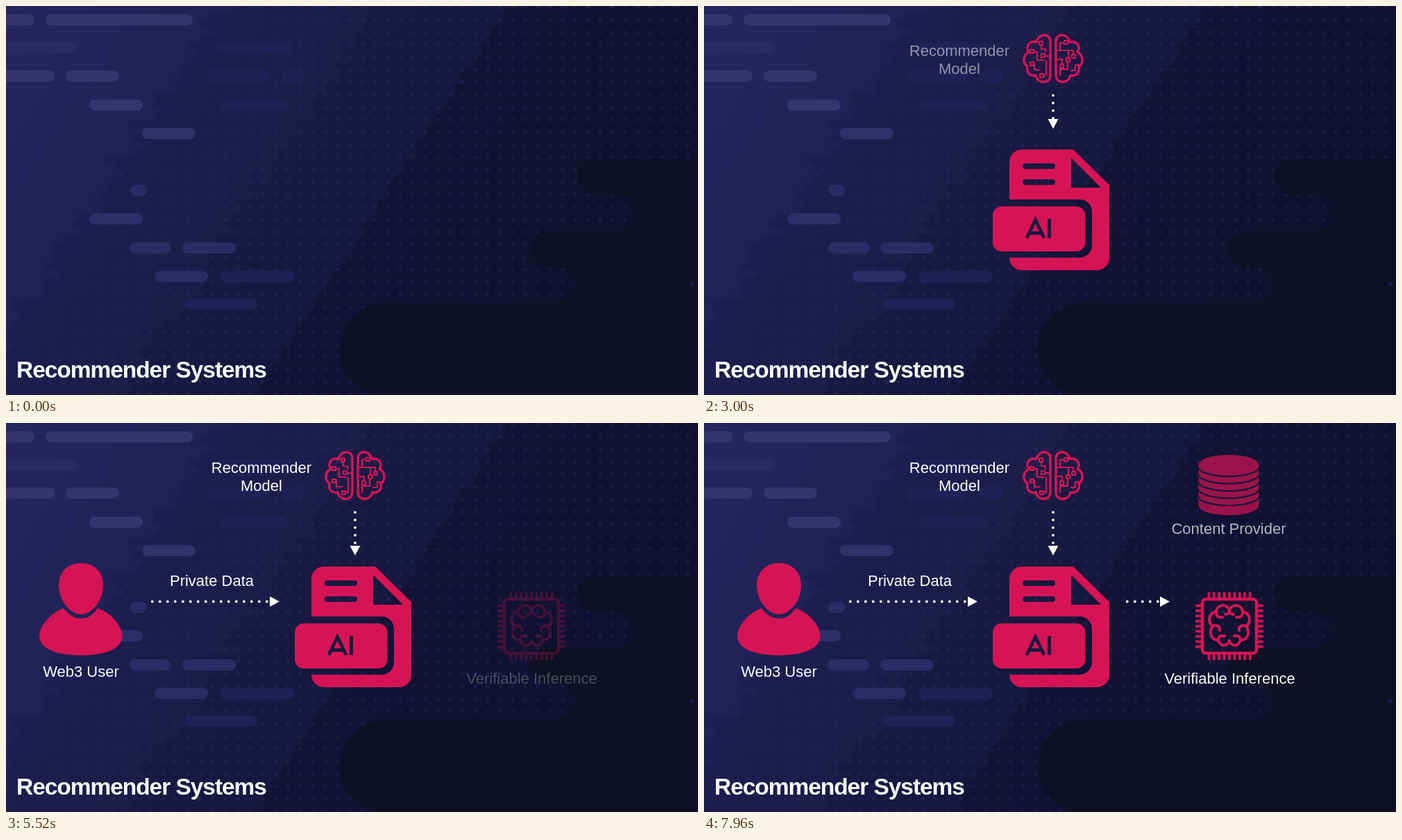
Recreate the animation shown at these times as an HTML page. Size 997 by 561 pixels, loop 8 s.

```html
<!DOCTYPE html>
<html lang="en">
<head>
<meta charset="utf-8">
<title>Recommender Systems</title>
<style>
html, body { margin: 0; width: 100%; height: 100%; overflow: hidden; background: #131433; }
svg { display: block; width: 100%; height: 100%; }
text { font: 22px "Liberation Sans", Arial, sans-serif; fill: #fff; text-anchor: middle; }
.title { font-size: 33.5px; font-weight: bold; letter-spacing: -1.05px; text-anchor: start; }
.red { fill: #d61455; }
.line { fill: none; stroke: #d61455; stroke-linejoin: round; stroke-linecap: round; }
.cut { fill: none; stroke: #17183d; }
.dots { stroke: #fff; stroke-width: 3.8; stroke-linecap: round; stroke-dasharray: 0 11; }
</style>
</head>
<body>
<svg viewBox="0 0 997 561">
  <defs>
    <linearGradient id="base" gradientUnits="userSpaceOnUse" x1="0" y1="0" x2="837" y2="547">
      <stop offset="0" stop-color="#252661"/>
      <stop offset=".6" stop-color="#1a1b45"/>
      <stop offset="1" stop-color="#141434"/>
    </linearGradient>
    <linearGradient id="fade" gradientUnits="userSpaceOnUse" x1="0" y1="0" x2="837" y2="547">
      <stop offset=".15" stop-color="#fff" stop-opacity="0"/>
      <stop offset=".45" stop-color="#fff"/>
    </linearGradient>
    <mask id="dotFade"><rect width="997" height="561" fill="url(#fade)"/></mask>
    <pattern id="grid" width="18" height="18" patternUnits="userSpaceOnUse" x="1" y="11">
      <circle cx="9" cy="9" r="2.7" fill="#30326f" opacity=".3"/>
    </pattern>
  </defs>

  <rect width="997" height="561" fill="url(#base)"/>
  <g id="bands" fill="#0c0d26"></g>
  <rect width="997" height="561" fill="url(#grid)" mask="url(#dotFade)"/>
  <g id="bars"></g>
  <path fill="#0f1023" d="M997 221H848a25.5 25.5 0 0 0 0 51H883a26 26 0 0 1 0 52H781a26 26 0 0 0 0 52H794a26 26 0 0 1 0 52H548a67 67 0 0 0 0 134H997z"/>
  <circle cx="989" cy="401" r="3" fill="#1b1c50"/>
  <text class="title" x="15" y="536">Recommender Systems</text>

  <g id="file">
    <path class="red" fill-rule="evenodd" d="M440 279V225a18 18 0 0 1 18-18H532L584 258V363a18 18 0 0 1-18 18H458a18 18 0 0 1-18-18H541a18 18 0 0 0 18-18V297a18 18 0 0 0-18-18z
      M529 219V262H572z M463 227h39a4 4 0 0 1 0 8h-39a4 4 0 0 1 0-8z M463 250h39a4 4 0 0 1 0 8h-39a4 4 0 0 1 0-8z"/>
    <rect class="red" x="416" y="289" width="133.500" height="65" rx="13"/>
    <path class="cut" stroke-width="4.800" d="M465 334.500L477.500 308.500L490 334.500M469 327.500H486M497.500 307V334.500"/>
  </g>

  <g id="brain" class="line" stroke-width="3.400">
    <path id="half" d="M499 50C498 39 482 39 479 52C468 49 463 60 468 66C459 71 459 83 466 87C464 97 471 102 478 100C481 113 498 112 499 101Z"/>
    <use href="#half" transform="matrix(-1 0 0 1 1006 0)"/>
    <path stroke-width="2.200" d="M486 56V62H492V66M475 66H480V78H490M491 72H498M476 83V92H484M489 100H493V79M508 64H532V69M519 53H513V64M525 64V74M516 83V77H508M513 100V91H524V80M529 93H535V85H541"/>
    <path stroke-width="2.200" d="M483 51h5v5h-5zM470 63h5v5h-5zM486 69h5v5h-5zM470 81h5v5h-5zM484 98h5v5h-5zM519 50h5v5h-5zM530 70h5v5h-5zM522 75h5v5h-5zM513 84h5v5h-5z"/>
  </g>
  <g id="model">
    <text x="368" y="72">Recommender</text>
    <text x="368" y="98">Model</text>
  </g>

  <g id="user">
    <path class="red" d="M108 202C128 202 140 216 140 234C140 256 124 276 108 276C92 276 76 256 76 234C76 216 88 202 108 202z"/>
    <path class="red" d="M83 267C91 278 100 282 108 282C116 282 125 278 132 267C152 274 167.500 293 167.500 307C167.500 326 142 335 108 335C74 335 48 326 48 307C48 293 64 274 83 267z"/>
    <text x="108" y="366">Web3 User</text>
  </g>
  <text id="data" x="296.500" y="235">Private Data</text>

  <g id="chip">
    <g class="line" stroke-width="4">
      <rect x="718" y="254" width="78" height="78" rx="5" stroke-width="4.500"/>
      <path id="pins" stroke-width="3.600" stroke-linecap="butt"/>
      <g id="lobe">
        <path d="M757 270C753 260 739 261 738 272C727 274 725 287 733 293C726 302 732 314 741 313C744 324 755 322 757 314"/>
        <path d="M738 273C738 279 742 281 747 280M733 293C739 290 744 294 743 299M741 313C741 308 745 306 750 307M757 270C757 274 754 276 751 276"/>
      </g>
      <use href="#lobe" transform="matrix(-1 0 0 1 1514 0)"/>
    </g>
    <text x="757.500" y="375.500">Verifiable Inference</text>
  </g>

  <g id="provider">
    <path class="red" d="M712.500 60a43.500 14 0 0 1 87 0V119a43.500 14 0 0 1-87 0z"/>
    <path id="gaps" class="cut" stroke-width="2.200"/>
    <text x="756" y="159.500">Content Provider</text>
  </g>

  <g id="arrows"></g>
</svg>
<script>
const $ = id => document.getElementById(id);
const clamp = v => Math.min(1, Math.max(0, v));
const add = (parent, tag, attrs) => {
  const el = document.createElementNS('http://www.w3.org/2000/svg', tag);
  for (const k in attrs) el.setAttribute(k, attrs[k]);
  return parent.appendChild(el);
};

// Diagonal bands with ragged, rounded edges
let seed = 7;
const random = () => (seed = seed * 16807 % 2147483647) / 2147483647;
for (const [top, alpha, rough] of [[305, .1, 46], [530, .1, 30], [722, .35, 10]]) {
  const band = add($('bands'), 'g', { opacity: alpha });
  for (let y = -10; y < 561; y += 10.3)
    add(band, 'rect', { x: top - y * .655 + (random() - .5) * rough, y, width: 1400, height: 11, rx: 5.5 });
}

// Background pills: left, right, top, colour
const lit = '#34356e', mid = '#2b2c66', dim = '#2a2b62', faint = '#1f2157';
[[-20, 41, 12, lit], [57, 269, 12, lit], [-20, 103, 52, dim], [-20, 70, 93, lit], [86, 163, 93, lit],
 [120, 197, 135, lit], [196, 273, 176, '#303169'], [179, 203, 258, mid], [120, 197, 299, '#2e2f69'],
 [178, 238, 341, mid], [254, 331, 341, mid], [214, 291, 382, mid], [303, 412, 52, faint],
 [289, 380, 93, faint], [396, 430, 93, faint], [309, 406, 135, faint], [309, 416, 382, faint], [257, 362, 422, faint]]
  .forEach(([l, r, y, fill]) => add($('bars'), 'rect', { x: l, y, width: r - l, height: 16, rx: 8, fill }));

let pins = '', gaps = '';
for (let i = -4; i <= 4; i++) {
  const x = 757 + i * 7.4, y = 293 + i * 7.4;
  pins += `M${x} 244v8M${x} 334v8M708 ${y}h8M798 ${y}h8`;
}
for (let i = 0; i < 5; i++) gaps += `M712 ${63 + i * 10.5}a44 14 0 0 0 88 0`;
$('pins').setAttribute('d', pins);
$('gaps').setAttribute('d', gaps);

const arrows = [[2430, 'translate(503 118) rotate(90)', 73], [4552, 'translate(200 257.5)', 194], [6045, 'translate(599 257.5)', 72]]
  .map(([start, transform, length]) => {
    const g = add($('arrows'), 'g', { transform });
    return { start, length, dots: add(g, 'path', { class: 'dots' }), head: add(g, 'path', { fill: '#fff' }) };
  });

const fades = { file: 1090, brain: 1850, model: 2690, user: 3940, data: 4590, chip: 5370, provider: 7550 };
const wobbles = [['file', 3240, 500, 294], ['chip', 6850, 757.5, 309.5]];

function draw(t) {
  for (const id in fades) $(id).setAttribute('opacity', clamp((t - fades[id]) / 590));

  for (const { start, length, dots, head } of arrows) {
    const len = length * (1 - Math.cos(Math.PI * clamp((t - start) / 800))) / 2;
    const size = Math.min(14, len), back = len - size, half = size * .53;
    dots.setAttribute('d', back > 11 ? `M10.8 0H${back}` : '');
    head.setAttribute('d', `M${back} ${-half}L${len} 0L${back} ${half}z`);
  }

  for (const [id, start, x, y] of wobbles) {
    const p = clamp((t - start) / 640);
    const angle = 5.6 * Math.sin(5 * Math.PI * p), shift = 1.6 * Math.sin(Math.PI * p);
    $(id).setAttribute('transform', `translate(${shift}) rotate(${angle} ${x} ${y})`);
  }
}

const begin = performance.now();
function tick() {
  const t = (performance.now() - begin) % 8000;
  draw(t - t % 40);
  requestAnimationFrame(tick);
}
tick();
</script>
</body>
</html>
```
